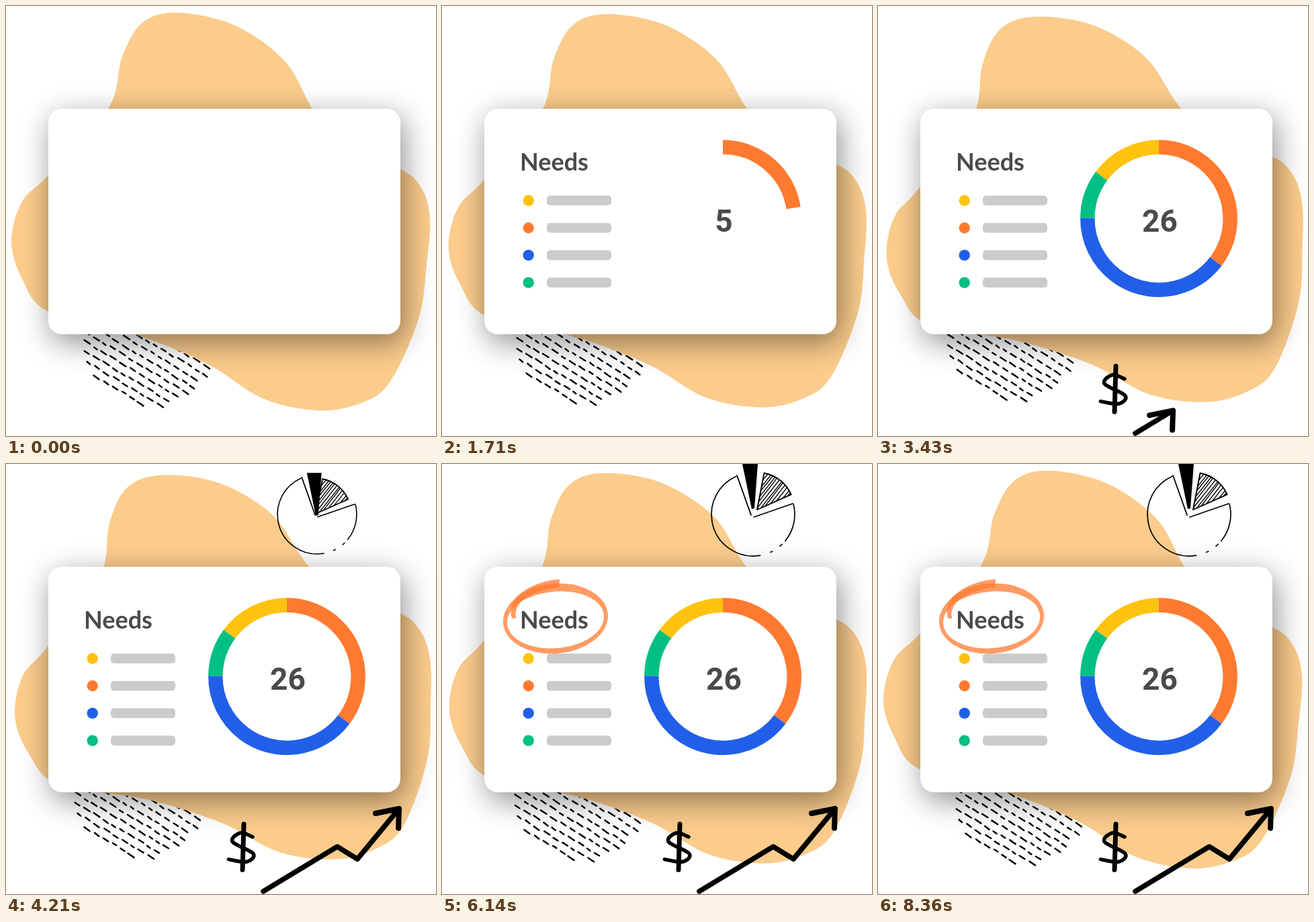
Write an HTML page with a canvas that moves like this. It is 640 by 640 pixels and loops after 8430 ms.

```html
<!DOCTYPE html>
<html lang="en">
<head>
<meta charset="utf-8">
<title>Needs chart</title>
<style>
  html, body { margin: 0; width: 100%; height: 100%; overflow: hidden; background: #fff; }
  canvas { display: block; width: 640px; height: 640px; }
</style>
</head>
<body>
<canvas id="stage" width="640" height="640"></canvas>
<script>
const ctx = document.getElementById('stage').getContext('2d');
const LOOP = 8430, TAU = Math.PI * 2;
const ORANGE = '#ff7a30', BLUE = '#225fe8', GREEN = '#00bf83', YELLOW = '#ffc20f', INK = '#4a4a4a';

const span = (t, start, length) => Math.min(1, Math.max(0, (t - start) / length));
const easeOut = (p, power = 2) => 1 - (1 - p) ** power;
const backOut = p => p <= 0 ? 0 : 1 + 2.9 * (p - 1) ** 3 + 1.9 * (p - 1) ** 2;
const noise = n => { const v = Math.sin(n * 12.9898) * 43758.5453; return v - Math.floor(v); };

// One coordinate of a Catmull-Rom curve between b and c
function curve(a, b, c, d, u) {
  const cubic = 3 * (b - c) + d - a;
  const square = 2 * a - 5 * b + 4 * c - d;
  return b + u / 2 * (c - a + u * (square + u * cubic));
}

function smooth(points, closed = false) {
  const n = points.length, out = [];
  const at = i => closed ? points[(i + n) % n] : points[Math.min(n - 1, Math.max(0, i))];
  for (let i = 0; i < (closed ? n : n - 1); i++) {
    const [a, b, c, d] = [at(i - 1), at(i), at(i + 1), at(i + 2)];
    for (let u = 0; u < 1; u += 0.125) {
      out.push([0, 1].map(k => curve(a[k], b[k], c[k], d[k], u)));
    }
  }
  return out;
}

// Strokes the first part of a line and returns its tip
function trace(points, part, width) {
  const gap = i => Math.hypot(points[i + 1][0] - points[i][0], points[i + 1][1] - points[i][1]);
  let tip = points[0], left = part * points.slice(1).reduce((sum, p, i) => sum + gap(i), 0);
  if (left <= 0) return tip;
  ctx.beginPath();
  ctx.moveTo(...tip);
  for (let i = 0; i < points.length - 1 && left > 0; i++) {
    const u = Math.min(1, left / gap(i));
    tip = points[i].map((v, k) => v + (points[i + 1][k] - v) * u);
    ctx.lineTo(...tip);
    left -= gap(i);
  }
  ctx.lineWidth = width;
  ctx.stroke();
  return tip;
}

function fillPolygon(points) {
  ctx.beginPath();
  points.forEach(p => ctx.lineTo(...p));
  ctx.fill();
}

function group(draw) {
  ctx.save();
  draw();
  ctx.restore();
}

const blob = smooth([
  [257, 10], [341, 29], [415, 82], [456, 153], [502, 216], [587, 243], [619, 272], [631, 318],
  [626, 385], [614, 466], [571, 560], [528, 591], [465, 602], [382, 584], [300, 533], [190, 488],
  [63, 455], [24, 406], [8, 350], [24, 291], [63, 252], [152, 153], [173, 75], [204, 24]
], true);
const dollar = smooth([[367, 555], [349, 549], [337, 562], [368, 580], [358, 592], [329, 588]]);
const trend = [[383, 636], [493, 569.5], [523, 588], [585, 513]];

function drawDashes(sway) {
  group(() => {
    ctx.translate(215 - 14 * sway, 495 - 9.5 * sway);
    ctx.rotate(0.54);
    ctx.lineWidth = 2.5;
    ctx.beginPath();
    let seed = 1;
    for (let v = -94; v < 100; v += 12.2) {
      const half = Math.sqrt(101 ** 2 - v * v);
      for (let u = -half + 4 * noise(seed); u < half - 4;) {
        const length = 5 + 6 * noise(++seed), y = v + 2 * noise(seed + 50);
        ctx.moveTo(u, y);
        ctx.lineTo(u + length, y + noise(seed + 90));
        u += length + 6 + 2 * noise(seed + 7);
      }
    }
    ctx.stroke();
  });
}

function drawBlob(sway) {
  group(() => {
    ctx.translate(320, 303);
    ctx.rotate(-0.087 * sway);
    ctx.translate(-320, -303);
    ctx.fillStyle = '#fbcc8c';
    fillPolygon(blob);
  });
}

function drawCard() {
  group(() => {
    ctx.shadowColor = 'rgba(0,0,0,.45)';
    ctx.shadowBlur = 45;
    ctx.shadowOffsetX = 5;
    ctx.shadowOffsetY = 12;
    ctx.fillStyle = '#fff';
    ctx.beginPath();
    ctx.roundRect(63, 153, 524, 335.5, 20);
    ctx.fill();
  });
}

function drawLegend(t) {
  group(() => {
    ctx.beginPath();
    ctx.rect(100, 214, 140, 32);
    ctx.clip();
    ctx.fillStyle = INK;
    ctx.font = '700 36px Lato, sans-serif';
    ctx.fillText('Needs', 116, 245 + 32 * (1 - easeOut(span(t, 550, 600), 3)));
  });
  [YELLOW, ORANGE, BLUE, GREEN].forEach((color, i) => {
    const y = 289.5 + 40.7 * i, delay = 150 * i;
    ctx.fillStyle = color;
    ctx.beginPath();
    ctx.arc(128.7, y, 8.2 * backOut(span(t, 555 + delay, 500)), 0, TAU);
    ctx.fill();
    group(() => {
      ctx.beginPath();
      ctx.rect(156, y - 8, 96 * easeOut(span(t, 710 + delay, 400)), 16);
      ctx.clip();
      ctx.fillStyle = '#cbcbcb';
      ctx.beginPath();
      ctx.roundRect(156, y - 7.3, 96, 14.6, 5);
      ctx.fill();
    });
  });
}

function drawDonut(t) {
  if (t < 1400) return;
  const sweep = 360 * span(t, 1400, 1373);
  let from = 0;
  group(() => {
    ctx.lineCap = 'butt';
    ctx.lineWidth = 21.5;
    [[127, ORANGE], [270.5, BLUE], [306.5, GREEN], [360, YELLOW]].forEach(([to, color]) => {
      if (sweep > from) {
        ctx.strokeStyle = color;
        ctx.beginPath();
        ctx.arc(418, 316.3, 106.2, (from - 90) * TAU / 360, (Math.min(to, sweep) - 90) * TAU / 360);
        ctx.stroke();
      }
      from = to;
    });
    ctx.fillStyle = INK;
    ctx.font = '700 46px Roboto, sans-serif';
    ctx.textAlign = 'center';
    ctx.fillText(Math.round(26 * span(t, 1400, 1585)), 419.5, 336);
  });
}

function drawArrow(t) {
  const part = span(t, 3190, 960);
  if (!part) return;
  const [x, y] = trace(trend, part, 7.5);
  trace([[x - 35, y + 7], [x, y], [x - 1, y + 29]], 1, 8);
}

function drawPie(t) {
  const size = easeOut(span(t, 3900, 400));
  if (!size) return;
  const inset = 10 * (1 - easeOut(span(t, 4400, 1000)));
  group(() => {
    ctx.translate(463, 75);
    ctx.scale(size, size);
    ctx.lineWidth = 1.7;
    // Rim with a few pen gaps
    [[-.25, .69], [.8, .87], [1.09, 1.14], [1.4, 4.29]].forEach(([from, to]) => {
      ctx.beginPath();
      ctx.arc(0, 0, 62, from, to);
      ctx.stroke();
    });
    trace([[-24, -58], [-3, 1]], 1, 1.8);
    trace([[1, 4], [59, -16]], 1, 1.8);
    fillPolygon([[-16, inset - 75], [7, inset - 75], [2, inset - 9], [-2, inset - 8]]);

    ctx.translate(6 - inset * .8, inset * .6 - 7);
    ctx.beginPath();
    ctx.moveTo(0, 0);
    ctx.arc(0, 0, 55.5, -1.38, -.42);
    ctx.closePath();
    ctx.lineWidth = 1.9;
    ctx.stroke();
    ctx.clip();
    for (let i = 0; i < 13; i++) {
      const x = 5 * i - 29 + 1.5 * noise(i);
      trace([[x, 2], [x + 46 + 4 * noise(i + 20), -58]], 1, 1.4);
    }
  });
}

// A marker ring that starts inside its ellipse and flies off at the end
function ringPoint(u, side) {
  const a = 3.3 + 7.8 * u;
  const reach = 1 - .17 * (1 - span(u, 0, .08)) + .13 * span(u, .88, .12);
  const half = side * (3 + 2 * Math.sin(a) ** 2 - Math.sin(a));
  const x = (75 * reach + half) * Math.cos(a), y = (47 * reach + half) * Math.sin(a);
  return [169 + x + .06 * y, 231 + y - .08 * x];
}

function drawRing(t) {
  const end = span(t, 4750, 1000);
  const band = (from, to) => {
    const outer = [], inner = [];
    for (let i = 0; i <= 60; i++) {
      const u = from + (to - from) * i / 60;
      outer.push(ringPoint(u, 1));
      inner.unshift(ringPoint(u, -1));
    }
    fillPolygon([...outer, ...inner]);
  };
  group(() => {
    ctx.globalAlpha = .75;
    ctx.fillStyle = ORANGE;
    if (end > 0) band(0, Math.min(.8, end));
    if (end > .8) band(.8, end);
  });
}

function draw(t) {
  const sway = (1 - Math.cos(t / LOOP * TAU)) / 2;
  ctx.clearRect(0, 0, 640, 640);
  ctx.strokeStyle = '#000';
  ctx.lineCap = ctx.lineJoin = 'round';
  drawDashes(sway);
  drawBlob(sway);
  drawCard();
  drawLegend(t);
  drawDonut(t);
  ctx.fillStyle = '#000';
  trace(dollar, span(t, 2750, 300), 5.5);
  trace([[354, 536], [352, 604]], span(t, 3000, 200), 7);
  drawArrow(t);
  drawPie(t);
  drawRing(t);
}

const begin = performance.now();
function tick() {
  draw((performance.now() - begin) % LOOP);
  requestAnimationFrame(tick);
}
tick();
</script>
</body>
</html>
```
